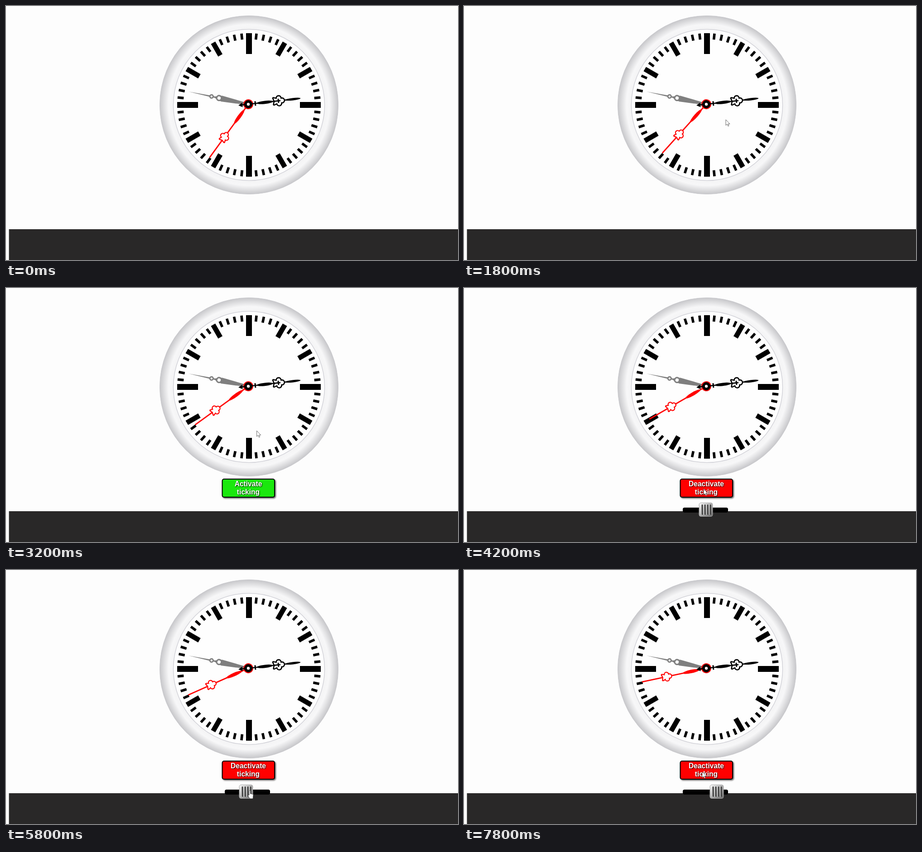
An HTML page that plays this animation: 998 by 561 pixels, repeating every 8 s.

```html
<!DOCTYPE html>
<html lang="en">
<head>
<meta charset="utf-8">
<title>Analogue clock</title>
<style>
  html, body { margin: 0; width: 100%; height: 100%; overflow: hidden; background: #fdfdfd; }
  svg { display: block; width: 100vw; height: 100vh; }
  text { text-anchor: middle; font-weight: bold; fill: #fff; }
  #footer text { font-family: "Liberation Serif", "Times New Roman", serif; font-size: 15.4px; }
  #footer .title { font-size: 18px; text-decoration: underline; }
  #button text { font: bold 15.6px "Liberation Sans", Arial, sans-serif; text-shadow: 1px 1px 2px #000; }
  #button rect { filter: drop-shadow(2px 2px 1.5px #0009); }
</style>
</head>
<body>
<svg viewBox="0 0 998 561">
  <defs>
    <radialGradient id="rim" gradientUnits="userSpaceOnUse" cx="536.5" cy="218.5" r="197.5">
      <stop offset=".85" stop-color="#f4f4f5"/>
      <stop offset=".9" stop-color="#f7f7f8"/>
      <stop offset=".95" stop-color="#dfdfe1"/>
      <stop offset="1" stop-color="#c6c6c9"/>
    </radialGradient>
    <linearGradient id="metal" x2="1" y2="1">
      <stop stop-color="#fff"/>
      <stop offset=".5" stop-color="#b0b0b0"/>
      <stop offset="1" stop-color="#666"/>
    </linearGradient>
    <g id="trefoil">
      <circle cx="-5" r="3.6"/><circle cx="5" r="3.6"/><circle cy="-6" r="3.6"/>
      <path d="M-4-4H4V4L6 10 0 8-6 10-4 4Z"/>
    </g>
    <g id="ornament">
      <use href="#trefoil" stroke="currentColor" stroke-width="4.6" stroke-linejoin="round"/>
      <use href="#trefoil" fill="#fefefe"/>
    </g>
  </defs>

  <circle cx="536.5" cy="218.5" r="197" fill="url(#rim)" stroke="#c9c9cd"/>
  <circle cx="536.5" cy="218.5" r="167" fill="#fefefe" stroke="#d2d2d8" stroke-width="1.5"/>
  <g id="ticks" transform="translate(536.5 218.5)"></g>

  <g transform="translate(535 217)">
    <g transform="rotate(282)" fill="#7f7f7f">
      <path d="M-2 0L-6.500-60-1.500-76V-88L0-135 1.500-88V-76L6.500-60 2 0Z"/>
      <circle cy="-66" r="7"/><circle cy="-83" r="5"/>
      <g fill="#fefefe"><circle cy="-66" r="3.7"/><circle cy="-83" r="2.2"/></g>
    </g>
    <g id="second" fill="#f00" color="#f00">
      <circle r="11"/>
      <path d="M0 0V-145" stroke="#f00" stroke-width="2.8"/>
      <ellipse cy="-34" rx="3.8" ry="19"/>
      <use href="#ornament" transform="translate(0 -89) rotate(180)"/>
    </g>
    <g transform="rotate(83.5)">
      <path d="M0 18V-113" stroke="#000" stroke-width="2.4"/>
      <path d="M-5 13H5L0 22ZM-5-14H5V-17H-5Z"/>
      <ellipse cy="-37" rx="3.4" ry="18"/>
      <ellipse cy="-99" rx="2.6" ry="17"/>
      <g transform="translate(0 -68) scale(1.15)">
        <use href="#ornament"/>
        <path d="M0 10V-3M-4 1H4" stroke="#000" stroke-width="2.500"/>
      </g>
      <circle r="9"/><circle r="3.2" fill="#fefefe"/>
    </g>
  </g>

  <g id="footer">
    <rect x="6.500" width="992" height="400" fill="#292828"/>
    <text class="title" x="182" y="84">My Pages</text>
    <text class="title" x="484.500" y="84">Clock Tick Function!</text>
    <text class="title" x="787" y="84">Related Projects</text>
    <text x="167" y="133" style="font-size:21px">Tolned</text>
    <rect x="202" y="107" width="28" height="28" fill="#fff"/>
    <text x="484.500" y="124">Activate/Deactivate Ticks!</text>
    <text x="787" y="124">Analogue Stopwatch</text>
  </g>

  <g id="button">
    <rect x="477.500" y="422" width="115.500" height="40" rx="4" stroke="#000" stroke-width="2"/>
    <text id="label" x="535" y="438"></text>
    <text x="535" y="456">ticking</text>
  </g>

  <g id="slider">
    <rect x="483" y="485" width="100" height="11" rx="4"/>
    <g id="thumb" stroke-linecap="round">
      <rect x="-15" y="-15" width="30" height="30" rx="4" fill="url(#metal)" stroke="#aaa"/>
      <path id="grooves" d="M-9-10V10m6-20V10m6-20V10m6-20V10" stroke="#eee" stroke-width="3"/>
      <use href="#grooves" x="1" style="filter:brightness(.25)"/>
    </g>
  </g>

  <g id="cursor" fill="#fff" stroke="#555" stroke-width=".9" stroke-linejoin="round">
    <path id="arrow" d="M0 0V12.500L3 10 5 14.500 7 13.500 5 9.500H9Z"/>
    <path id="hand" d="M0 1Q1-1 2.500 1V7L9 8.500 8 18H1.500L-3 11 0 10Z"/>
  </g>
</svg>
<script>
const $ = id => document.getElementById(id);

function tickSize(minute) {
  if (minute % 15 === 0) return [13, 46];
  return minute % 5 === 0 ? [11, 32] : [5.6, 13.5];
}

for (let i = 0; i < 60; i++) {
  const [width, length] = tickSize(i);
  $('ticks').innerHTML += `<rect x="${-width / 2}" y="-158.5" width="${width}" height="${length}" transform="rotate(${i * 6})"/>`;
}

const ramp = (t, from, to) => Math.min(1, Math.max(0, (t - from) / (to - from)));
const move = (id, x, y) => $(id).setAttribute('transform', `translate(${x} ${y})`);
const show = (id, visible) => $(id).style.display = visible ? '' : 'none';

// The pointer glides to each stop, arriving at the given time.
function pointer(t, thumbX) {
  const stops = [
    [1400, 578, 251], [2400, 505, 482], [3000, 566, 251],
    [3600, 529, 444], [4800, thumbX + 7, 487], [7600, 526, 446]
  ];
  return stops.reduce(([x, y], [arrival, toX, toY]) => {
    const k = ramp(t, arrival - 600, arrival);
    return [x + (toX - x) * k, y + (toY - y) * k];
  }, [750, 60]);
}

function draw() {
  const t = Math.floor(performance.now() % 8000 / 200) * 200;
  const active = t >= 4000;
  const hand = t >= 4800 && t < 7000;
  const footerY = 493 - 128 * (ramp(t, 1800, 2200) - ramp(t, 2800, 3200));
  const thumbX = 534 - 4 * ramp(t, 5000, 5400) + 28 * ramp(t, 5800, 6800);

  $('second').setAttribute('transform', `rotate(${(36 + Math.floor(t / 1000)) * 6})`);
  move('footer', 0, footerY);
  move('thumb', thumbX, 489.5);
  move('cursor', ...pointer(t, thumbX));

  show('button', t >= 3200);
  show('slider', active);
  show('cursor', t >= 800);
  show('hand', hand);
  show('arrow', !hand);
  $('button').setAttribute('fill', active ? '#f00' : '#1ae80e');
  $('label').textContent = active ? 'Deactivate' : 'Activate';
  requestAnimationFrame(draw);
}
draw();
</script>
</body>
</html>
```
